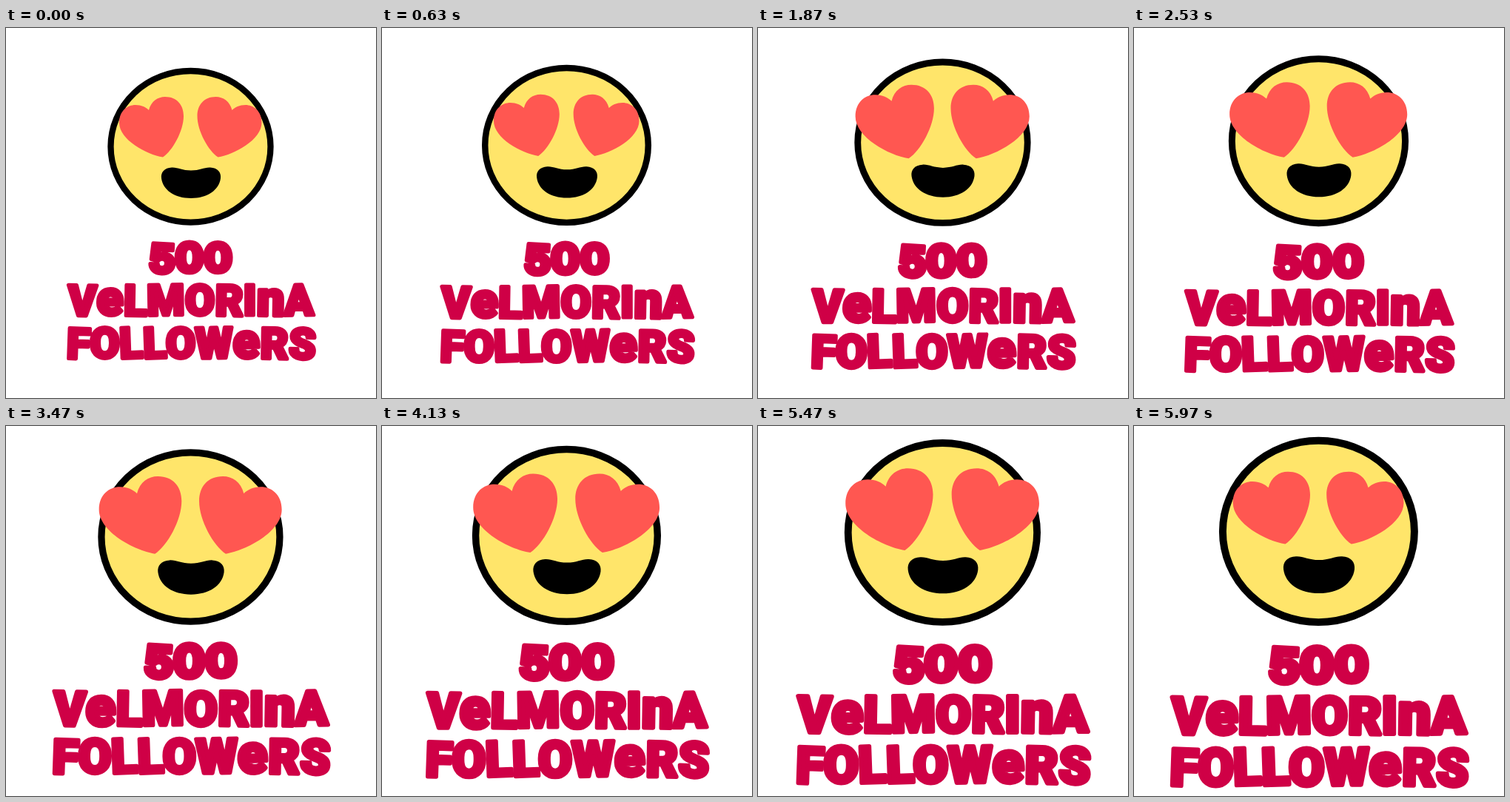
An HTML page that plays this animation: 500x500 px, repeating every 6010 ms.

```html
<!DOCTYPE html>
<html lang="en">
<head>
<meta charset="utf-8">
<title>500 followers</title>
<style>
  html, body { margin: 0; height: 100%; overflow: hidden; background: #fff; }
  svg { display: block; width: 100%; height: 100%; }
  text {
    font: 900 58px Roboto, "Open Sans", sans-serif;
    letter-spacing: .4px;
    text-anchor: middle;
    fill: #cf0046;
    stroke: #cf0046;
    stroke-width: 5;
    stroke-linejoin: round;
  }
  .count { font: 900 55px Inter, sans-serif; letter-spacing: 0; }
  .tall { font-size: 66px; }
</style>
</head>
<body>
<svg viewBox="0 0 500 500">
  <defs>
    <path id="heart" fill="#ff5751" d="M212 174.5C190 171 153 151 153 128C153 112 164 104 175 104C183 104 189 107 193 111C196 99 205 93 215 93C231 93 240 104 240 119C240 139 225 166 212 174.5Z"/>
  </defs>
  <g id="scene">
    <ellipse cx="249.5" cy="160.3" rx="108" ry="102.3" fill="#ffe56a" stroke="#000" stroke-width="8.3"/>
    <path d="M250 192.5C262 192.5 268 188 276 188.5C286 189 291 195 290 203C288 219 272 230 250 230C228 230 212 219 210 203C209 195 214 189 224 188.5C232 188 238 192.5 250 192.5Z"/>
    <g id="eyes">
      <use href="#heart"/>
      <use href="#heart" transform="translate(498.5) scale(-1 1)"/>
    </g>
    <text class="count" x="249.5" y="330.5" rotate="3 0 -1">500</text>
    <text x="250" y="388.5" rotate="1 0 1 -1 0 1 0 1 -1">V<tspan class="tall">e</tspan>LMORI<tspan class="tall">n</tspan>A</text>
    <text x="250" y="446.5" rotate="2 0 -2 -2 0 -1 -2 1 2">FOLLOW<tspan class="tall">e</tspan>RS</text>
  </g>
</svg>
<script>
  const LOOP = 6010, BEAT = 260;
  const scene = document.getElementById('scene');
  const eyes = document.getElementById('eyes');

  const scaleAt = (x, y, s) => `translate(${x} ${y}) scale(${s}) translate(${-x} ${-y})`;

  function draw(now) {
    const t = now % LOOP;
    scene.setAttribute('transform', scaleAt(250, 250, 1 + t / 30000));
    // The hearts snap between two sizes.
    const big = Math.floor(t / BEAT) % 2;
    eyes.setAttribute('transform', scaleAt(249.25, 133.5, big ? 1.15 : 1));
  }

  const start = performance.now();
  function tick() {
    draw(performance.now() - start);
    requestAnimationFrame(tick);
  }
  tick();
</script>
</body>
</html>
```
